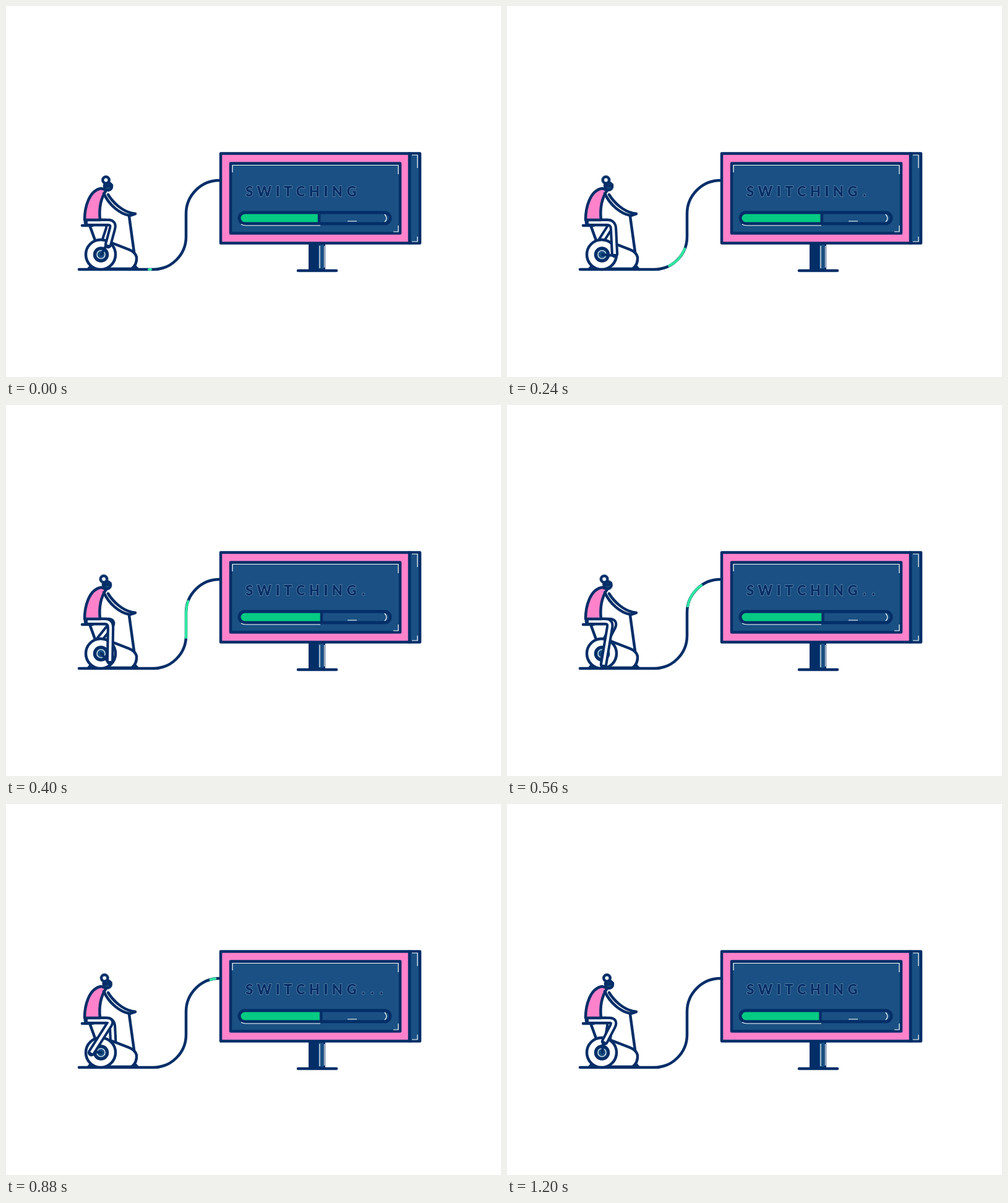
Write an HTML page without scripts that moves like this. It is 800 px wide and 600 px high and loops after 1.28 s.

```html
<!DOCTYPE html>
<html lang="en">
<head>
<meta charset="utf-8">
<title>Switching</title>
<style>
  html, body { margin: 0; width: 100%; height: 100%; overflow: hidden; }
  svg { display: block; width: 100vw; height: 100vh; animation: flash 1.28s step-end infinite; }
  .bg { fill: currentColor; }
  .line { stroke: #042e68; stroke-width: 4.5; stroke-linecap: round; stroke-linejoin: round; fill: none; }
  .line.solid { fill: currentColor; }
  .navy { fill: #042e68; }
  .teal, .line.teal { fill: #1a5083; }
  .pink, .line.pink { fill: #ff82cb; }
  .glint { fill: none; stroke: currentColor; stroke-width: 1.2; }
  text {
    font: 900 22.3px Lato, sans-serif; letter-spacing: 6.4px; fill: #042e68;
    stroke: currentColor; stroke-width: 1px; stroke-opacity: .5; paint-order: stroke;
  }

  .limb { fill: none; stroke: #042e68; stroke-width: 12.4; stroke-linejoin: round; }
  .limb.in { stroke: currentColor; stroke-width: 4.2; }
  .leg { animation: pedal 1.28s step-end infinite; }
  .leg:not(.in) { stroke-linecap: round; }
  .far { animation-delay: -.64s; }
  .crank { transform-origin: 154px 402px; animation: spin 1.28s steps(16) infinite; }
  .head { transform-origin: 160px 304px; animation: nod 1.28s ease-in-out infinite; }
  .fill { animation: load 1.28s infinite; }
  .pulse { fill: none; stroke: #2ee9a0; stroke-width: 4; stroke-linecap: round; animation: pulse 1.28s step-end infinite; }
  .dot { animation: 1.28s step-end infinite; }
  .d1 { animation-name: dot1; }
  .d2 { animation-name: dot2; }
  .d3 { animation-name: dot3; }

  @keyframes flash {
    0%, 31.25% { color: #fff; }
    25% { color: #2f6caa; }
  }
  @keyframes spin { from { transform: rotate(-62deg); } to { transform: rotate(298deg); } }
  @keyframes nod { 0%, 94%, 100% { transform: rotate(0); } 45% { transform: rotate(-11deg); } }
  @keyframes load {
    0%, 97%, 100% { transform: none; animation-timing-function: ease-out; }
    45% { transform: translateX(4.5px); animation-timing-function: ease-in; }
  }
  @keyframes dot1 { 0%, 87.5% { visibility: hidden; } 12.5% { visibility: visible; } }
  @keyframes dot2 { 0%, 87.5% { visibility: hidden; } 37.5% { visibility: visible; } }
  @keyframes dot3 { 0%, 87.5% { visibility: hidden; } 62.5% { visibility: visible; } }
  @keyframes pulse {
    0% { stroke-dasharray: 3 400; stroke-dashoffset: -3; visibility: visible; }
    6.25% { stroke-dasharray: 10 400; stroke-dashoffset: -8; }
    12.5% { stroke-dasharray: 22 400; stroke-dashoffset: -18; }
    18.75% { stroke-dasharray: 38 400; stroke-dashoffset: -35; }
    25% { stroke-dasharray: 56 400; stroke-dashoffset: -61; }
    31.25% { stroke-dasharray: 59 400; stroke-dashoffset: -90; }
    37.5% { stroke-dasharray: 51 400; stroke-dashoffset: -117; }
    43.75% { stroke-dasharray: 41 400; stroke-dashoffset: -141; }
    50% { stroke-dasharray: 30 400; stroke-dashoffset: -162; }
    56.25% { stroke-dasharray: 20 400; stroke-dashoffset: -179; }
    62.5% { stroke-dasharray: 13 400; stroke-dashoffset: -191; }
    68.75% { stroke-dasharray: 8 400; stroke-dashoffset: -200; }
    75% { stroke-dasharray: 3 400; stroke-dashoffset: -208; visibility: visible; }
    81.25%, 100% { stroke-dasharray: 1 400; stroke-dashoffset: -213; visibility: hidden; }
  }
  @keyframes pedal {
    0%, 100% { d: path("M132 350H165Q174.6 350 172 360L165 386"); }
    6.25% { d: path("M132 350H164Q173.7 350 173 360L171 391"); }
    12.5% { d: path("M132 350H163Q172.5 350 173 360L174 397"); }
    18.75% { d: path("M132 350H162Q171.4 350 172 360L174 401"); }
    25% { d: path("M132 350H161Q170 350 170 360L172 408"); }
    31.25% { d: path("M132 350H160Q169 350 169 360L168 414"); }
    37.5% { d: path("M132 350H159Q168 350 167 360L162 418"); }
    43.75% { d: path("M132 350H159Q168 350 166 360L156 420"); }
    50% { d: path("M132 350H159Q168.4 350 166 360L147 418"); }
    56.25% { d: path("M132 350H160Q169.3 350 165 359L141 414"); }
    62.5% { d: path("M132 350H161Q170.5 350 166 359L138 409"); }
    68.75% { d: path("M132 350H162Q171.8 350 166 358L138 402"); }
    75% { d: path("M132 350H163Q173 350 167 358L139 394"); }
    81.25% { d: path("M132 350H164Q174 350 168 358L144 388"); }
    87.5% { d: path("M132 350H165Q174.8 350 169 358L150 385"); }
    93.75% { d: path("M132 350H165Q175 350 171 359L158 384"); }
  }
</style>
</head>
<body>
<svg viewBox="0 0 800 600">
  <rect class="bg" width="800" height="600"/>

  <!-- cable -->
  <path class="line" d="M118 426H238A53 53 0 0 0 291 373V336A54 54 0 0 1 345 282"/>
  <path class="pulse" d="M228 426H238A53 53 0 0 0 291 373V336A54 54 0 0 1 345 282"/>

  <!-- bike and rider -->
  <path class="limb leg far" d="M132 350H159Q168 350 166 360L147 418"/>
  <path class="limb in leg far" d="M132 350H159Q168 350 166 360L147 418"/>
  <path class="line" d="M123 355H140M136 357L144 379M199 340L207 398"/>
  <path class="line solid" d="M153 425H203Q212 418 211 406Q209 398 199 394L168 382"/>
  <circle class="line solid" cx="153" cy="402" r="24"/>
  <path class="navy" d="M137 417L129 427H142ZM208 417L203 427H217Z"/>
  <circle class="line teal" cx="153.500" cy="402" r="10.500"/>
  <circle class="glint" cx="153.500" cy="402" r="6.500"/>
  <path class="line crank" d="M154 402H168"/>
  <path class="limb leg" d="M132 350H165Q174 350 172 360L165 386"/>
  <path class="limb in leg" d="M132 350H165Q174 350 172 360L165 386"/>
  <path class="line pink" d="M127 346C127 326 134 298 154 295L162 298C153 311 150 328 152 346Z"/>
  <path class="line solid" d="M158 303C166 321 183 336 200 339L209 336L203 335C187 331 173 318 165 305"/>
  <g class="head">
    <circle class="line teal" cx="165" cy="292" r="6"/>
    <path class="line" d="M159 290Q164 293 171 290"/>
    <circle class="line solid" cx="161.500" cy="281.500" r="5.200"/>
  </g>

  <!-- billboard -->
  <rect class="navy" x="489" y="384" width="27" height="43"/>
  <rect class="teal" x="505" y="386" width="8" height="39"/>
  <path class="line" d="M472 428H534"/>
  <rect class="line teal" x="652" y="238.500" width="17" height="145"/>
  <rect class="line pink" x="347" y="238.500" width="305" height="145"/>
  <rect class="line teal" x="363" y="254.500" width="274" height="113"/>
  <clipPath id="bar"><rect x="377" y="334" width="244" height="18" rx="9"/></clipPath>
  <g clip-path="url(#bar)">
    <g class="fill">
      <rect x="360" y="334" width="146" height="18" fill="#05cb83"/>
      <path class="line" d="M506 334V352"/>
    </g>
  </g>
  <rect class="line" x="377" y="334" width="244" height="18" rx="9" style="stroke-width:5"/>
  <text x="387" y="308">SWITCHING</text>
  <text class="dot d1" x="575" y="308">.</text>
  <text class="dot d2" x="589.500" y="308">.</text>
  <text class="dot d3" x="604" y="308">.</text>
  <path class="glint" d="M366 269V257.500H634V272M634 355V365H626M656 241H665V262M665 373V381H656M552 348H567M612 337q6 7 0 12M380 353q3 2 8 2H508M507 388V424M514.500 388V423"/>
</svg>
</body>
</html>
```
